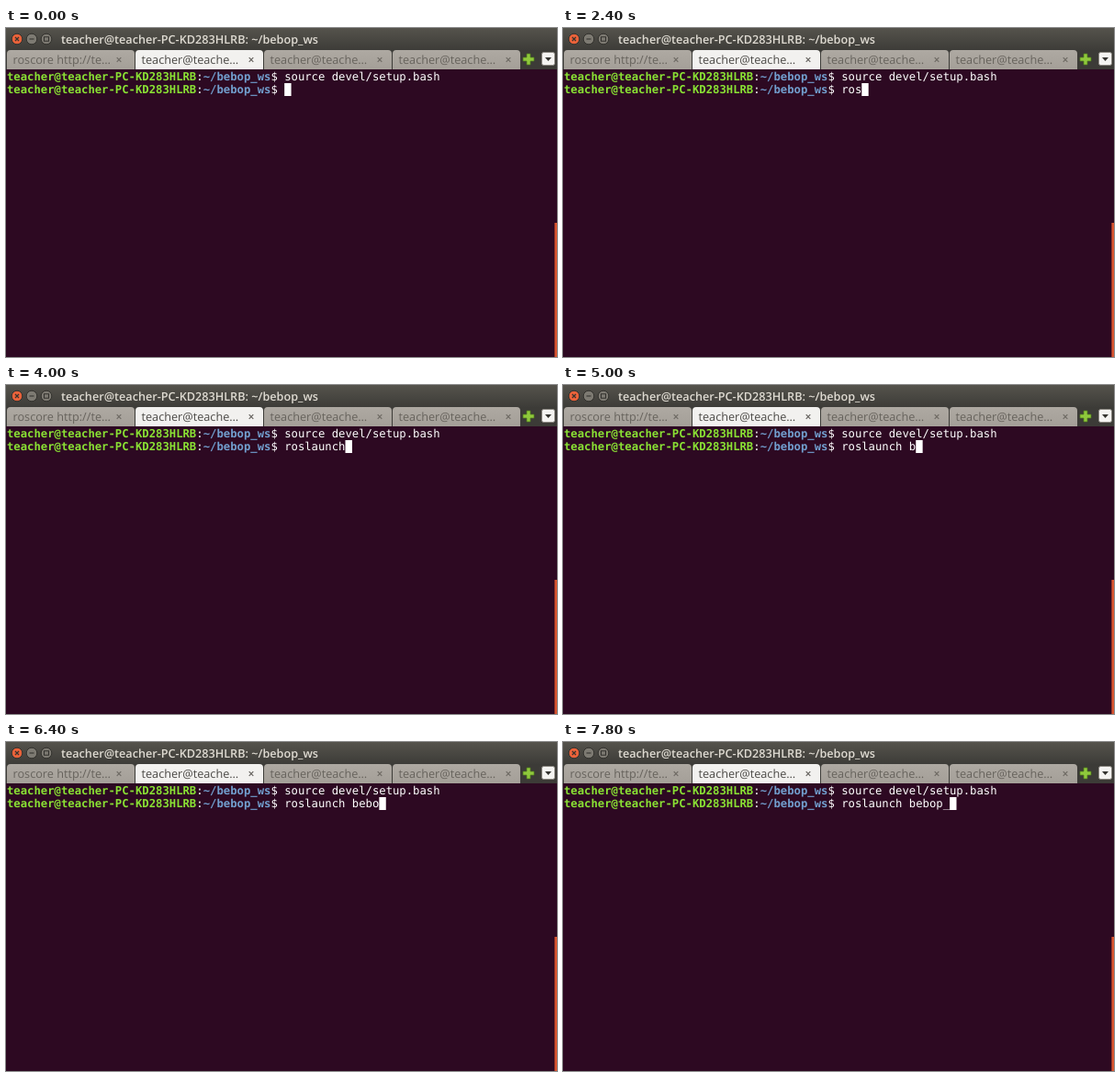
These frames come from a looping animation (600x358 px, 8000 ms). An HTML page:

```html
<!DOCTYPE html>
<html lang="en">
<head>
<meta charset="utf-8">
<title>Terminal</title>
<style>
  html, body { margin: 0; width: 100%; height: 100%; overflow: hidden; background: #2d0922; }
  svg { display: block; width: 100%; height: 100%; }
  text { white-space: pre; text-rendering: geometricPrecision; }
  .ui { font-family: "Open Sans", "Noto Sans", sans-serif; }
  .title { font-size: 12.67px; font-weight: 600; fill: #dfdbd2; }
  .tab { font-size: 12.7px; fill: #67635d; }
  .tab.on { fill: #4c4a47; }
  .mono { font: 12.24px "DejaVu Sans Mono", monospace; fill: #fff; }
  .user { font-weight: 700; fill: #8ae234; }
  .path { font-weight: 700; fill: #729fcf; }
</style>
</head>
<body>
<svg id="stage" viewBox="0 0 600 358">
  <defs>
    <linearGradient id="bar" x2="0" y2="1">
      <stop offset="0" stop-color="#55534c"/>
      <stop offset="1" stop-color="#3d3c38"/>
    </linearGradient>
    <linearGradient id="idle" x2="0" y2="1">
      <stop offset="0" stop-color="#aea9a2"/>
      <stop offset="1" stop-color="#a49f98"/>
    </linearGradient>
  </defs>
  <rect width="600" height="358" fill="#2d0922"/>
  <rect width="600" height="45" fill="#3c3b37"/>
  <rect width="600" height="24" fill="url(#bar)"/>
  <g id="buttons" fill="none" stroke="#33322e"></g>
  <text id="title" class="ui title" x="60" y="17"></text>
  <g id="tabs"></g>
  <path d="M567 28h4v4h4v4h-4v4h-4v-4h-4v-4h4z" fill="#8fc83c" stroke="#4f7d1c" stroke-width=".7"/>
  <rect x="583.5" y="26.5" width="14" height="14" rx="2" fill="#f4f3f1" stroke="#8b8781"/>
  <path d="M587 32h7l-3.5 4z" fill="#33322f"/>
  <g id="lines"></g>
  <text id="typed" class="mono" y="71"></text>
  <rect id="cursor" y="60" width="7.4" height="14" fill="#fff"/>
  <rect x="597.4" y="212" width="2.6" height="146" fill="#d9552f"/>
</svg>
<script>
const LOOP = 8000;
const LEFT = 1;
const CELL = 7.37;
const USER = "teacher";
const HOST = "teacher-PC-KD283HLRB";
const DIR = "~/bebop_ws";
const COMMAND = "roslaunch bebop_";
// Time in ms at which each character of the command appears
const KEYS = [1600, 2000, 2200, 2600, 2800, 3200, 3400, 3600, 3800,
              4400, 5000, 5400, 5600, 6400, 6800, 7600];

const $ = id => document.getElementById(id);
const column = n => LEFT + n * CELL;

function add(parent, tag, attrs, content = "") {
  const node = document.createElementNS("http://www.w3.org/2000/svg", tag);
  for (const key in attrs) node.setAttribute(key, attrs[key]);
  node.textContent = content;
  parent.append(node);
  return node;
}

function drawButtons() {
  const colors = ["#e9623a", "#7d7a72", "#7d7a72"];
  const marks = ["M10 10l4 4m0-4l-4 4", "M25.5 12h5", "M41.5 9.8h5v4.4h-5z"];
  colors.forEach((fill, i) => {
    add($("buttons"), "circle", { cx: 12 + 16 * i, cy: 12, r: 5.8, fill });
    add($("buttons"), "path", { d: marks[i], "stroke-width": 1.1 });
  });
}

function drawTab(label, i) {
  const x = 1 + 140 * i;
  const on = i === 1;
  const right = x + 139;
  add($("tabs"), "path", {
    d: `M${x} 45V28q0-4 4-4H${right - 4}q4 0 4 4V45z`,
    fill: on ? "#f2f1ef" : "url(#idle)"
  });
  add($("tabs"), "text", { class: on ? "ui tab on" : "ui tab", x: x + 6.5, y: 39 }, label);
  const cx = i ? x + 126 : 123;
  add($("tabs"), "path", {
    d: `M${cx - 2.3} 32.2l4.6 4.6m0-4.6l-4.6 4.6`,
    stroke: on ? "#65625e" : "#6d6963",
    "stroke-width": 1.2
  });
}

// Draws one shell prompt and returns the column after it
function drawPrompt(y) {
  const parts = [[`${USER}@${HOST}`, "mono user"], [":", "mono"], [DIR, "mono path"], ["$ ", "mono"]];
  let col = 0;
  for (const [text, cls] of parts) {
    add($("lines"), "text", { class: cls, x: column(col), y }, text);
    col += text.length;
  }
  return col;
}

$("title").textContent = `${USER}@${HOST}: ${DIR}`;
drawButtons();
const short = `${USER}@${HOST.slice(0, 6)}…`;
[`roscore http://${HOST.slice(0, 2)}…`, short, short, short].forEach(drawTab);
const start = drawPrompt(57);
add($("lines"), "text", { class: "mono", x: column(start), y: 57 }, "source devel/setup.bash");
drawPrompt(71);
$("typed").setAttribute("x", column(start));

function render(time) {
  const count = KEYS.filter(key => key <= time).length;
  $("typed").textContent = COMMAND.slice(0, count);
  $("cursor").setAttribute("x", column(start + count));
}

function tick() {
  render(performance.now() % LOOP);
  requestAnimationFrame(tick);
}
tick();
</script>
</body>
</html>
```
